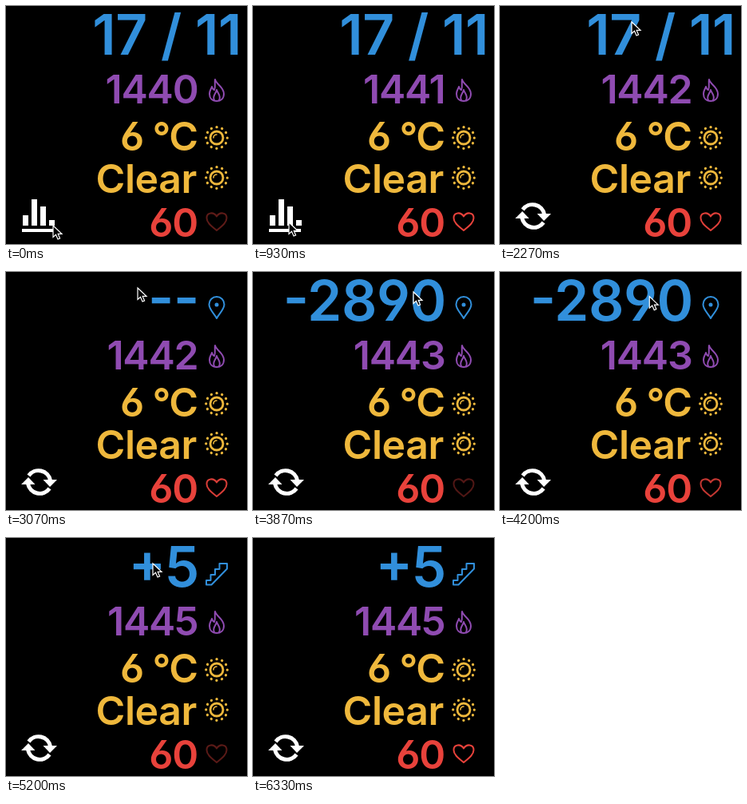
An HTML page that plays this animation: 302 px wide and 298 px high, repeating every 6540 ms.

```html
<!DOCTYPE html>
<html lang="en">
<head>
<meta charset="utf-8">
<title>Watch face</title>
<style>
html, body { margin: 0; width: 100%; height: 100%; overflow: hidden; background: #000; }
svg { display: block; width: 100vw; height: 100vh; }
text {
  font: 600 50px Inter, Roboto, sans-serif;
  font-feature-settings: "case", "cv03", "cv04";
  letter-spacing: -1.2px;
  text-anchor: end;
}
#top { font-size: 69.5px; letter-spacing: -0.4px; }
#sky { letter-spacing: -0.4px; }
.line { fill: none; stroke-width: 2; stroke-linejoin: round; stroke-linecap: round; }
</style>
</head>
<body>
<svg viewBox="0 0 302 298">
  <defs>
    <g id="sun" class="line" stroke="#efb83c">
      <circle r="8" stroke-width="2.8"/>
      <path d="M-4 0A4 4 0 0 1 0 -4" stroke-width="1.6"/>
      <circle r="13.300" pathLength="24" stroke-width="3.2" stroke-dasharray="0.05 1.950"/>
    </g>
  </defs>

  <text id="top" y="61" fill="#318fdb"></text>
  <text id="count" x="240.500" y="122" fill="#8f4bb1"></text>
  <g fill="#efb83c">
    <text x="240" y="181">6 °C</text>
    <text id="sky" x="239" y="234">Clear</text>
  </g>
  <text x="240" y="289" fill="#e8423b">60</text>

  <g class="line" stroke="#318fdb">
    <g id="pin">
      <path d="M264 58C261 52 254.500 47 254.500 40.500A9.500 9.500 0 0 1 273.500 40.500C273.500 47 267 52 264 58Z"/>
      <circle cx="264" cy="41" r="2.500" fill="#318fdb" stroke="none"/>
    </g>
    <path id="stairs" d="M251 53H256.500V46H262V39H267.500V32H277V38.500L257.500 58.500H251Z"/>
  </g>
  <g class="line" stroke="#8f4bb1">
    <path d="M262 92C264 99 273 101 273 110C273 116 269 119 264 119C258 119 255 115 255 110C255 106 257 104 258 101C259 104 260 105 261 105C263 101 261 96 262 92Z"/>
    <path d="M261 118C258 113 263 110 264 105C265 109 270 112 267 118"/>
  </g>
  <use href="#sun" x="264" y="165"/>
  <use href="#sun" x="264" y="215"/>
  <path id="heart" class="line" stroke="#e8423b" d="M264 281C258 276 251.500 271.500 251.500 265.500C251.500 258 260.500 257.500 264 263.500C267.500 257.500 276.500 258 276.500 265.500C276.500 271.500 270 276 264 281Z"/>

  <path id="bars" fill="#fff" d="M21 262h7v13h-7zM32 242h7v33h-7zM43 251h7v24h-7zM54 268h7v7h-7zM20 279h40v4h-40z"/>
  <g id="sync" fill="#fff">
    <path d="M28.500 255A15 15 0 0 1 55.500 261M54.500 271A15 15 0 0 1 27.500 265" fill="none" stroke="#fff" stroke-width="5"/>
    <path d="M46.500 260H64L55 269ZM19 266H36.500L28 257Z"/>
  </g>
  <path id="cursor" d="M0 0V14.500L3.500 11.300L6 17L8.600 15.900L6.200 10.400H11Z" stroke="#fff" stroke-width="1.2"/>
</svg>
<script>
const LOOP = 6540;
const SYNC_AT = 1000, PIN_AT = 2470, STAIRS_AT = 4530;
const ticks = [300, 2270, 3250, 4250, 5170];
// Cursor moves: begin, end, destination
const moves = [
  [70, 470, 45, 271],
  [1270, 1530, 136, 5],
  [1530, 1870, 165, 20],
  [3070, 3600, 201, 25],
  [3870, 4330, 184, 32],
  [5600, 5800, 176, -20]
];

const el = id => document.getElementById(id);
const show = (id, on) => el(id).setAttribute("visibility", on ? "visible" : "hidden");

// Smooth rise from 0 to 1 between two times
function ease(t, begin, end) {
  const p = Math.min(1, Math.max(0, (t - begin) / (end - begin)));
  return p * p * (3 - 2 * p);
}

function cursorAt(t) {
  let x = 59, y = 275;
  for (const [begin, end, toX, toY] of moves) {
    const p = ease(t, begin, end);
    x += (toX - x) * p;
    y += (toY - y) * p;
  }
  return [x, y];
}

// The heart brightens slowly and dims quickly every two seconds
function heartLevel(t) {
  const phase = (t + 70) % 2000;
  return ease(phase, 0, 400) - ease(phase, 1100, 1300);
}

function topText(t, beats) {
  if (t < PIN_AT) return "17 / 11";
  if (t < STAIRS_AT) return ["--", "-2890", "-2887"][beats - 2];
  return beats < 5 ? "--" : "+5";
}

function draw(t) {
  const beats = ticks.filter(tick => tick <= t).length;
  el("count").textContent = 1440 + beats;
  el("top").textContent = topText(t, beats);
  el("top").setAttribute("x", t < PIN_AT ? 295 : 242);
  show("bars", t < SYNC_AT);
  show("sync", t >= SYNC_AT);
  show("pin", t >= PIN_AT && t < STAIRS_AT);
  show("stairs", t >= STAIRS_AT);
  el("heart").setAttribute("opacity", 0.35 + 0.65 * heartLevel(t));
  el("cursor").setAttribute("transform", `translate(${cursorAt(t)})`);
}

const start = performance.now();
function frame() {
  draw((performance.now() - start) % LOOP);
  requestAnimationFrame(frame);
}
frame();
</script>
</body>
</html>
```
